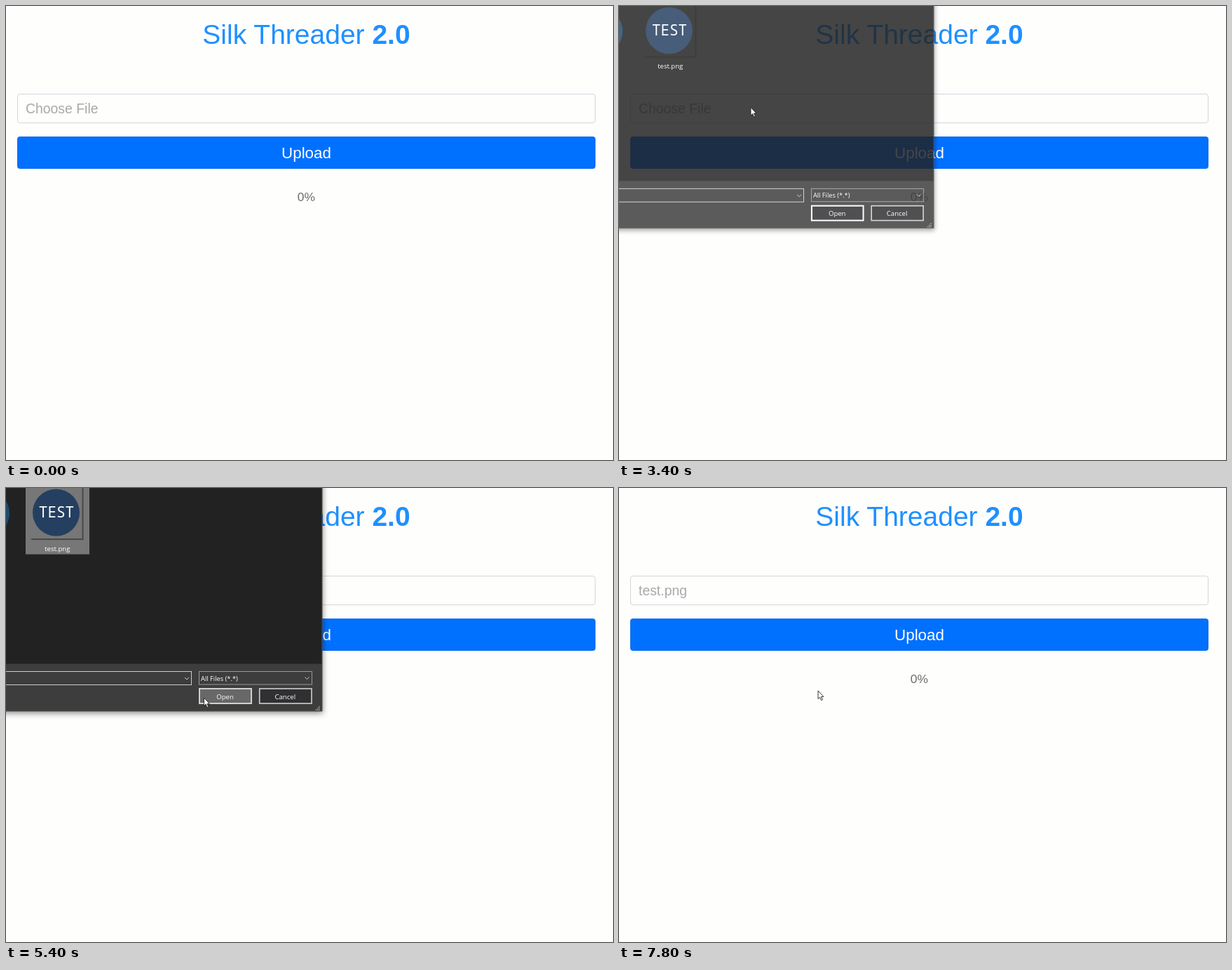
Write an HTML page that moves like this. It is 866 px wide and 647 px high and loops after 8000 ms.

```html
<!DOCTYPE html>
<html lang="en">
<head>
<meta charset="utf-8">
<title>Silk Threader</title>
<style>
  html, body { margin: 0; width: 100%; height: 100%; overflow: hidden; background: #fefefd; }
  svg { display: block; width: 866px; height: 647px; font-family: "Liberation Sans", Arial, sans-serif; }
  .mid { text-anchor: middle; }
  #dialog { font: 9.6px "Open Sans", "Noto Sans", sans-serif; fill: #fff; }
  .line { fill: none; stroke: #ccc; }
</style>
</head>
<body>
<svg viewBox="0 0 866 647">
  <defs>
    <filter id="shadow" x="-10%" y="-10%" width="120%" height="120%">
      <feDropShadow dx="1" dy="3" stdDeviation="4" flood-opacity=".45"/>
    </filter>
  </defs>

  <text class="mid" x="428.5" y="54" font-size="39" fill="#1e90ff">Silk Threader <tspan font-weight="bold">2.0</tspan></text>
  <rect x="16.5" y="125.5" width="824" height="41" rx="3.5" fill="#fefefd" stroke="#d3d6da"/>
  <text id="file" x="28" y="153" font-size="19.4" fill="#a9a9a9"></text>
  <rect x="16.5" y="186.5" width="824" height="45" rx="3" fill="#0070ff" stroke="#0a6bea"/>
  <text class="mid" x="428.5" y="217" font-size="22.4" fill="#fff">Upload</text>
  <text class="mid" x="428.3" y="277.5" font-size="17.4" fill="#6c6c6c">0%</text>

  <g id="dialog">
    <rect x="-20" y="-20" width="471" height="338" fill="#3c3c3e" filter="url(#shadow)"/>
    <rect x="-20" y="-20" width="471" height="270.5" fill="#222223"/>
    <path d="M0 318H451V0" fill="none" stroke="#505052"/>
    <circle cx="-28" cy="36" r="33" fill="#1f4a6e"/>
    <rect id="tile" x="28" y="-5" width="91" height="99.5"/>
    <path d="M36 73H109.5V0" fill="none" stroke="#111" stroke-width="2" opacity=".45"/>
    <circle cx="71.5" cy="35" r="33.5" fill="#253f60"/>
    <text class="mid" x="72" y="42" font-size="21" font-family="Noto Sans Mono, monospace">TEST</text>
    <text class="mid" x="73.3" y="89.5">test.png</text>

    <rect class="line" x="-20" y="261.5" width="284.5" height="19"/>
    <rect class="line" x="275.5" y="261.5" width="161" height="18.5" style="stroke:#999"/>
    <path class="line" d="M255 270l3 3 3-3M426.5 269.5l3 3 3-3"/>
    <text x="278" y="274.5" font-size="9.3">All Files (*.*)</text>
    <rect id="open" x="276" y="286" width="74" height="21" stroke="#fff" stroke-width="2"/>
    <text class="mid" x="312.5" y="300.5">Open</text>
    <rect x="361.7" y="286" width="74.3" height="21" fill="#303032" stroke="#d0d0d0" stroke-width="1.6"/>
    <text class="mid" x="398.3" y="300.5">Cancel</text>
    <path d="M446.8 311v6M444.6 313.3v4M442.4 315.5v2" stroke="#bbb" stroke-width="1.3" stroke-dasharray="1.3 1"/>
  </g>

  <path id="cursor" d="M.5 .5V12L3.1 9.6 5 14 6.9 13.2 5 8.9H8.4Z" fill="#fff" stroke="#222" stroke-width=".9"/>
</svg>
<script>
const LOOP = 8000, STEP = 200;
const OPENED = 3400, SELECTED = 4600, PRESSED = 6000, CLOSED = 6400;
const el = id => document.getElementById(id);

// Pointer path: time, x, y
const path = [
  [1800, 250, 86], [2400, 187.5, 144], [3400, 187.5, 144], [4200, 92, 61],
  [4800, 92, 61], [5400, 282, 298.5], [7200, 282, 298.5], [7800, 283.5, 288.5]
];

function pointer(t) {
  const i = path.findIndex(p => p[0] > t);
  if (i < 1) return path.at(-1).slice(1);
  const [t0, x0, y0] = path[i - 1], [t1, x1, y1] = path[i];
  const u = (t - t0) / (t1 - t0), k = u * u * (3 - 2 * u);
  return [x0 + (x1 - x0) * k, y0 + (y1 - y0) * k];
}

function tileColor(t, x, y) {
  if (t >= PRESSED) return '#333334';
  if (t >= SELECTED) return '#777';
  return x < 119 && y < 94 ? '#4c4c4b' : 'none';
}

function draw(t) {
  const [x, y] = pointer(t);
  const overOpen = x > 275 && y > 285;
  el('cursor').style.display = t < path[0][0] ? 'none' : '';
  el('cursor').setAttribute('transform', `translate(${x} ${y})`);
  el('file').textContent = t < CLOSED ? 'Choose File' : 'test.png';

  const dialog = el('dialog'), fading = t < OPENED + STEP;
  dialog.style.display = t >= OPENED && t < CLOSED ? '' : 'none';
  dialog.setAttribute('opacity', fading ? .84 : 1);
  dialog.setAttribute('transform', fading ? 'translate(.3 .15) scale(.995)' : '');
  el('tile').setAttribute('fill', tileColor(t, x, y));
  el('open').setAttribute('fill', overOpen ? '#686869' : '#303032');
  el('open').setAttribute('stroke', overOpen ? '#d0d0d0' : '#fff');
}

const start = performance.now();
function frame() {
  const t = (performance.now() - start) % LOOP;
  draw(Math.floor(t / STEP) * STEP);
  requestAnimationFrame(frame);
}
frame();
</script>
</body>
</html>
```
